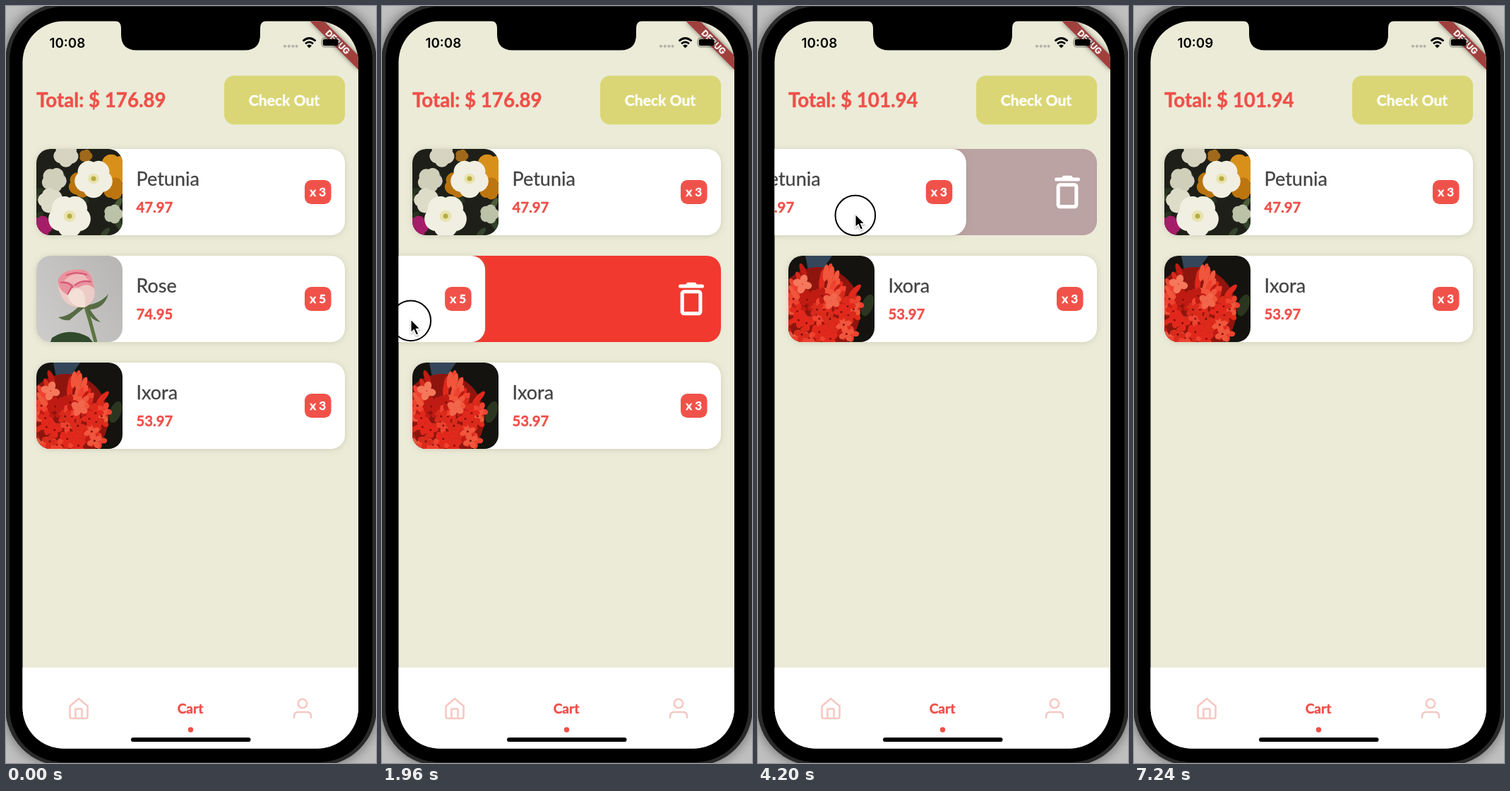
An HTML page that plays this animation: 524x1070 px, repeating every 7280 ms.

```html
<!DOCTYPE html>
<html lang="en">
<head>
<meta charset="utf-8">
<title>Cart</title>
<style>
html, body { margin: 0; width: 100%; height: 100%; overflow: hidden; background: #b4b4b4; }
svg { display: block; width: 524px; height: 1070px; }
text { font-family: Lato, "Noto Sans", sans-serif; }
.b { font-weight: 700; stroke-width: .45; }
.r { fill: #ee5048; }
text.r { stroke: #ee5048; }
.w { fill: #fff; stroke: #fff; }
.m { text-anchor: middle; }
.name { fill: #444; stroke: #444; stroke-width: .3; }
.clock, .debug { font-family: Inter, sans-serif; font-weight: 600; }
.debug { font-weight: 800; fill: #fff; }
.icon { fill: none; stroke: #f6c8c3; stroke-width: 2.6; stroke-linecap: round; stroke-linejoin: round; }
</style>
</head>
<body>
<svg id="stage" viewBox="0 0 524 1070" xmlns="http://www.w3.org/2000/svg"></svg>
<script>
const LOOP = 7280, PITCH = 151, WIDTH = 437;
const GREY = [179, 177, 180], RED = [242, 57, 47];
const FOLD_START = 2546.5, FOLD_TIME = 180;

let seed = 11;
const rnd = () => (seed = (seed * 16807) % 2147483647) / 2147483647;
const clamp = v => Math.max(0, Math.min(1, v));
const mix = (a, b, k) => a + (b - a) * k;
const ell = (x, y, rx, ry, fill, rot = 0) =>
  `<ellipse cx="${x.toFixed(1)}" cy="${y.toFixed(1)}" rx="${rx}" ry="${ry}" fill="${fill}" transform="rotate(${rot.toFixed(0)} ${x.toFixed(1)} ${y.toFixed(1)})"/>`;
const rect = (x, y, w, h, r, fill, more = '') =>
  `<rect x="${x}" y="${y}" width="${w}" height="${h}" rx="${r}" fill="${fill}" ${more}/>`;
const path = (d, fill, more = '') => `<path d="${d}" fill="${fill}" ${more}/>`;

// Ring of petals around a centre
function bloom(x, y, r, n, fat, fill, turn) {
  let s = '';
  for (let i = 0; i < n; i++) {
    const a = turn + i * 360 / n, q = a * Math.PI / 180;
    s += ell(x + Math.cos(q) * r * .55, y + Math.sin(q) * r * .55, r * .5, r * fat, fill, a);
  }
  return s;
}

const trumpet = (x, y, r, fill, turn) => ell(x, y, r * .8, r * .8, fill) + bloom(x, y, r, 5, .56, fill, turn);

function petunia() {
  let s = rect(0, 0, 122, 122, 0, '#1f1f19');
  for (let i = 0; i < 22; i++)
    s += ell(rnd() * 122, 20 + rnd() * 104, 9, 4, ['#34432a', '#27331f', '#4c5c38'][i % 3], rnd() * 180);
  s += trumpet(64, 50, 18, '#b9740f', 10) + trumpet(110, 30, 22, '#d9901a', 30)
    + trumpet(110, 56, 15, '#bd750f', 0) + trumpet(70, 10, 9, '#a0691a', 0);
  s += trumpet(42, 8, 17, '#d6d4c1', 20) + trumpet(25, 44, 17, '#d0cfba', 10)
    + trumpet(20, 73, 17, '#dddcc9', 40) + trumpet(109, 92, 13, '#bcc2a8', 0) + trumpet(7, 110, 15, '#a51d68', 0);
  for (const [x, y, r] of [[81, 42, 26], [47, 95, 29]])
    s += trumpet(x, y, r, '#f1efe2', 18) + ell(x, y, r * .3, r * .28, '#e9e3ae') + ell(x, y, 3.5, 3.5, '#b7ac3f');
  return s;
}

function rose() {
  return rect(0, 0, 122, 122, 0, 'url(#mist)')
    + path('M68 66Q77 94 84 122', 'none', 'stroke="#5b7642" stroke-width="5"')
    + path('M22 116Q46 100 74 115L80 122H20Z', '#314a2c')
    + path('M70 72Q57 82 47 91Q38 92 31 87Q49 85 62 69Z', '#566b43')
    + path('M70 70Q90 68 102 54Q96 75 76 76Q82 86 91 94Q78 92 72 78Z', '#566b43')
    + path('M30 36Q35 21 53 20Q76 17 79 33L83 53Q80 69 68 73Q52 74 42 66Q31 55 30 36Z', '#edcbc6')
    + path('M30 36Q34 22 52 20Q75 16 79 33L82 46Q72 37 60 45Q49 42 44 55Q33 51 30 36Z', '#e8929d')
    + path('M39 36Q49 23 67 27L75 36Q62 34 55 42Q47 37 39 36Z', '#f0b9bc')
    + path('M34 38Q46 36 52 45M54 42Q64 33 78 37M42 28Q55 21 72 27M44 55L50 44', 'none', 'stroke="#d65773" stroke-width="2.2"')
    + path('M44 57Q50 44 61 47Q71 52 69 73Q50 73 44 57Z', '#f3e0d7');
}

function ixora() {
  let s = rect(0, 0, 122, 122, 0, '#14130f') + path('M24 0H62L48 20H28Z', '#34465a')
    + ell(42, 78, 60, 62, '#8e150e') + ell(112, 70, 8, 16, '#2b3620', 20);
  const reds = ['#e2281c', '#c01b13', '#ef4230', '#d92a1b', '#f0563c'];
  for (let i = 0; i < 80; i++) {
    const a = rnd() * 6.283, d = Math.sqrt(rnd());
    const x = 42 + Math.cos(a) * d * 58, y = 76 + Math.sin(a) * d * 60, c = reds[i % 5];
    s += y < 56
      ? ell(x, y, 4, 12, c, (x - 45) * .9)
      : bloom(x, y, 11, 4, .36, c, rnd() * 90) + ell(x, y, 1.5, 1.5, '#7d100b');
  }
  return s + bloom(20, 40, 13, 4, .4, '#f4785c', 15) + bloom(61, 64, 12, 4, .4, '#f2664c', 30);
}

const trash = `<g class="trash">${rect(5, 4, 14, 2, 1, '#fff')}${path('M8.5 4.4L9.8 3H14.2L15.5 4.4Z', '#fff')}
  <rect x="7" y="8" width="10" height="12" rx="1" fill="none" stroke="#fff" stroke-width="2"/></g>`;

function row(id, name, price, count, art) {
  return `<g id="${id}" clip-path="url(#clip-${id})"><clipPath id="clip-${id}"><rect x="0" width="524"/></clipPath><g class="body">
    <g class="back">${rect(43, 0, WIDTH, 122, 20, '#b3b1b4', 'class="fill"')}${trash}</g>
    <g class="card">${rect(43, 0, WIDTH, 122, 20, '#fff', 'filter="url(#soft)"')}
      <g clip-path="url(#thumb)"><g transform="translate(43 0)">${art}</g></g>
      <text x="184.5" y="52" font-size="27" class="name">${name}</text>
      <text x="184.5" y="90" font-size="20.3" class="b r">${price}</text>
      ${rect(423, 44, 37.5, 34, 9.5, '#f0524a')}
      <text x="441.7" y="67" font-size="17" class="b m w">x ${count}</text>
    </g></g></g>`;
}

const stage = document.getElementById('stage');
stage.innerHTML = `<defs>
  <filter id="soft" x="-10%" y="-20%" width="120%" height="140%"><feDropShadow dx="0" dy="1" stdDeviation="4" flood-color="#83835c" flood-opacity=".28"/></filter>
  <filter id="dark" x="-30%" y="-30%" width="160%" height="160%"><feDropShadow dx="0" dy="0" stdDeviation="3.500" flood-opacity=".5"/></filter>
  <filter id="drop" x="-50%" y="-50%" width="200%" height="200%"><feDropShadow dx="0" dy="1.5" stdDeviation="1.3" flood-opacity=".35"/></filter>
  <filter id="halo"><feDropShadow dx="0" dy="0" stdDeviation="9" flood-opacity=".5"/></filter>
  <linearGradient id="mist" x1="0" y1=".8" x2="1" y2=".2"><stop stop-color="#cdcbc9"/><stop offset="1" stop-color="#b9b7b5"/></linearGradient>
  <clipPath id="thumb"><rect x="43" y="0" width="122" height="122" rx="20"/></clipPath>
  <clipPath id="screen"><rect x="23.500" y="21.500" width="475.500" height="1028" rx="58"/></clipPath>
</defs>
${rect(0, 0, 524, 1070, 0, '#c0c0c0')}
${rect(-1, -4, 526, 1078, 82, '#292929', 'filter="url(#halo)"')}
${rect(5, 1, 514, 1068, 76, '#000')}
<g clip-path="url(#screen)">
  ${rect(23, 21, 477, 1029, 0, '#ebebd8')}
  <text id="total" x="43" y="143" font-size="27.700" class="b r"></text>
  ${rect(309, 98.5, 171, 69, 14, '#dad675')}
  <text x="394" y="141" font-size="21.100" class="b m w">Check Out</text>
  ${row('petunia', 'Petunia', '47.97', 3, petunia())}
  ${row('rose', 'Rose', '74.95', 5, rose())}
  ${row('ixora', 'Ixora', '53.97', 3, ixora())}
  ${rect(23, 935, 477, 115, 0, '#fff')}
  <path class="icon" d="M90.5 989.5L103 979L115.5 989.5V1004Q115.5 1007 112.5 1007H93.5Q90.5 1007 90.5 1004ZM98.5 1007V993.5H107.5V1007"/>
  <path class="icon" d="M408 1006V1004Q408 998 414 998H426Q432 998 432 1004V1006"/><circle class="icon" cx="420" cy="986" r="6.3"/>
  <text x="261" y="1000" font-size="19.2" class="b r m">Cart</text>
  <circle cx="261.5" cy="1023" r="3.7" class="r"/>
  ${rect(177, 1034, 169.5, 6, 3, '#000')}
  ${path('M430 21H450L500 71V91Z', '#a03f3c', 'filter="url(#dark)"')}
  <text class="debug m" font-size="12.4" transform="translate(466.6 54.2) rotate(45)">DEBUG</text>
</g>
${path('M155 21Q163 22 163 31V40Q163 62.5 185 62.5H338Q360 62.5 360 40V31Q360 22 368 21Z', '#000')}
<text id="clock" x="61.5" y="58.5" font-size="18.8" class="clock"></text>
${[395, 400.7, 406.3, 411.5].map(x => `<circle cx="${x}" cy="56.8" r="2.1" fill="#b4b4a9"/>`).join('')}
${path('M420.5 49.5Q429.5 41.5 438.5 49.5M424 53.3Q429.5 48.5 435 53.3', 'none', 'stroke="#000" stroke-width="2.8"')}
${path('M426 56Q429.5 53 433 56L429.5 59.5Z', '#000')}
<rect x="447" y="45" width="25.5" height="13" rx="4" fill="none" stroke="#000" stroke-opacity=".45"/>
${rect(448.7, 46.7, 22, 9.6, 2.5, '#000')}${path('M474 49.5Q476.5 51.5 474 53.5Z', '#000', 'fill-opacity=".5"')}
<g id="pointer"><circle id="press" cy="2" r="28.3" fill="none" stroke="#000" stroke-width="2"/>
  <path d="M0 0V19L4.3 15L7.5 22.3L11 20.7L7.8 13.7H13.5Z" stroke="#fff" stroke-width="1.4" filter="url(#drop)"/></g>`;

const $ = (sel, root = stage) => root.querySelector(sel);

// Pointer path: time, x, y
const TRACK = [
  [450, 540, 400], [820, 400, 441], [980, 400, 443], [1250, 290, 442], [1480, 201, 441],
  [1750, 100, 442], [2060, 25, 443], [2300, 12, 443], [3070, 12, 443], [3320, 371, 290],
  [3650, 349, 294], [3850, 347, 295], [3980, 240, 295], [4115, 154, 294], [4200, 138, 294],
  [4480, 75, 295], [4900, 78, 297], [5235, 154, 298], [5360, 180, 298], [5620, 329, 300],
  [5780, 345, 300], [6060, 540, 330]
];

function slope(i, k) {
  const p = TRACK[i - 1], c = TRACK[i], n = TRACK[i + 1];
  if (!p || !n) return 0;
  const a = (c[k] - p[k]) / (c[0] - p[0]), b = (n[k] - c[k]) / (n[0] - c[0]);
  return a * b <= 0 ? 0 : 2 * a * b / (a + b);
}

function track(t, k) {
  const last = TRACK.length - 1;
  if (t <= TRACK[0][0]) return TRACK[0][k];
  if (t >= TRACK[last][0]) return TRACK[last][k];
  let i = 0;
  while (TRACK[i + 1][0] < t) i++;
  const a = TRACK[i], b = TRACK[i + 1], h = b[0] - a[0], u = (t - a[0]) / h, v = 1 - u;
  return v * v * (1 + 2 * u) * a[k] + u * u * (3 - 2 * u) * b[k]
    + h * u * v * (v * slope(i, k) - u * slope(i + 1, k));
}

// Standard ease: cubic-bezier(.25, .1, .25, 1)
function ease(x) {
  let lo = 0, hi = 1, u = x;
  for (let i = 0; i < 18; i++) {
    u = (lo + hi) / 2;
    const v = 1 - u;
    if (.75 * u * v * v + .75 * u * u * v + u * u * u < x) lo = u; else hi = u;
  }
  return .3 * u * (1 - u) ** 2 + 3 * u * u * (1 - u) + u ** 3;
}

const drag = (t, grab) => Math.min(0, track(t - 35, 1) - grab);

function roseShift(t) {
  if (t < 950) return 0;
  if (t < 2080) return drag(t, 383);
  const k = clamp((t - 2080) / 330);
  return mix(drag(2080, 383), -485, 1 - (1 - k) ** 2);
}

function place(id, y, shift, hot, fold) {
  const g = document.getElementById(id), h = PITCH * (1 - fold);
  g.setAttribute('transform', `translate(0 ${y})`);
  const clip = $('clipPath rect', g);
  clip.setAttribute('y', fold ? -14.5 : -30);
  clip.setAttribute('height', fold ? h : 182);
  g.style.display = fold < .999 ? '' : 'none';
  $('.body', g).setAttribute('transform', `translate(0 ${(h - PITCH) / 2})`);
  $('.card', g).setAttribute('transform', `translate(${shift.toFixed(2)} 0)`);
  $('.back', g).style.display = shift < 0 ? '' : 'none';
  $('.fill', g).setAttribute('fill', `rgb(${GREY.map((c, i) => Math.round(mix(c, RED[i], hot)))})`);
  const size = clamp((-shift / WIDTH - .2) / .2) * 36 / 14;
  $('.trash', g).setAttribute('transform', `translate(438 61) scale(${size}) translate(-12 -12)`);
}

function draw(t) {
  const fold = ease(clamp((t - FOLD_START) / FOLD_TIME));
  const hot = clamp((t - 4150) / 400) - clamp((t - 5270) / 400);
  place('petunia', 202, t > 3800 && t < 5700 ? drag(t, 329) : 0, hot, 0);
  place('rose', 202 + PITCH, roseShift(t), clamp((t - 1492) / 400), fold);
  place('ixora', 202 + PITCH * (2 - fold), 0, 0, 0);
  $('#total').textContent = 'Total: $ ' + (t < FOLD_START + FOLD_TIME ? '176.89' : '101.94');
  $('#clock').textContent = t < 6300 ? '10:08' : '10:09';
  const pointer = $('#pointer');
  pointer.style.display = t > 450 && t < 6060 ? '' : 'none';
  pointer.setAttribute('transform', `translate(${track(t, 1).toFixed(2)} ${track(t, 2).toFixed(2)})`);
  const held = (t > 950 && t < 2080) || (t > 3800 && t < 5700);
  $('#press').style.display = held ? '' : 'none';
}

const start = performance.now();
function tick() {
  draw((performance.now() - start) % LOOP);
  requestAnimationFrame(tick);
}
tick();
</script>
</body>
</html>
```
